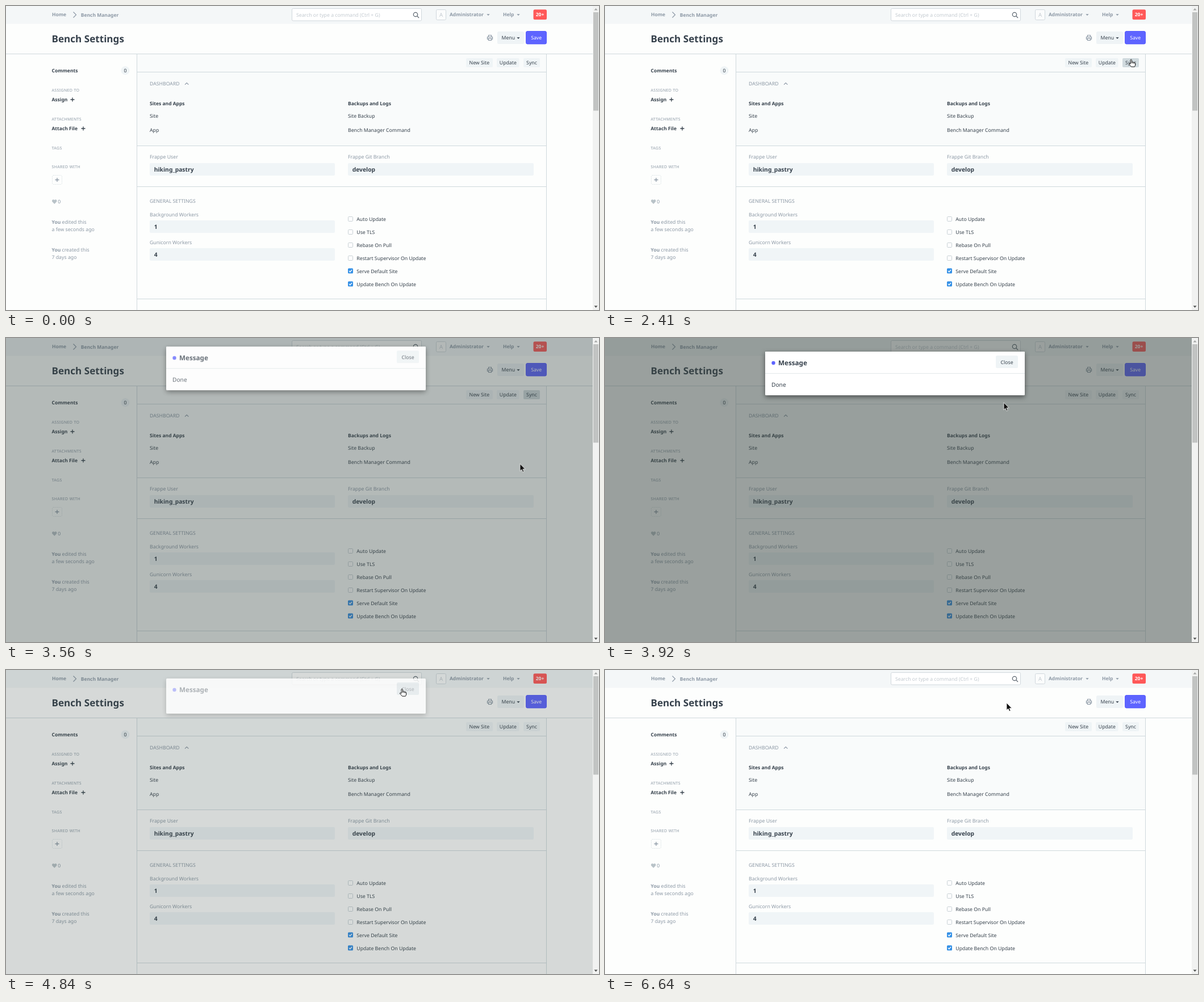
Animation, 1044 px wide and 536 px high, one loop 6710 ms. Source, as an HTML page:

```html
<!DOCTYPE html>
<html lang="en">
<head>
<meta charset="utf-8">
<title>Bench Settings</title>
<style>
  html, body { margin: 0; width: 100%; height: 100%; overflow: hidden; background: #fdfefd; }
  svg { display: block; width: 100vw; height: 100vh; }
  text { font: 8.72px "Noto Sans", "Open Sans", sans-serif; fill: #36414c; text-rendering: geometricPrecision; }
  .bold text, text.bold, tspan.bold { font-weight: 700; font-size: 8.5px; }
  .muted text, text.muted { fill: #8d99a6; }
  .caps text { font-size: 7px; letter-spacing: .35px; fill: #8d99a6; }
  .value text { font-weight: 700; font-size: 10.3px; }
  text.title { font-size: 17.1px; font-weight: 600; }
  .line { fill: none; stroke: #cfd9dd; }
  .field { fill: #f0f5f7; }
  .button { fill: #eff4f6; }
  .icon { fill: none; stroke: #8d99a6; stroke-width: 1.2; }
  .plus { fill: none; stroke: #36414c; stroke-width: 1.3; }

  .anim { animation: 6710ms linear infinite both; }
  #pointer { animation-name: move; }
  #arrow { animation-name: arrow; animation-timing-function: step-end; }
  #hand { animation-name: hand; animation-timing-function: step-end; }
  #sync { animation-name: sync; animation-timing-function: step-end; }
  #close { animation-name: close; animation-timing-function: step-end; }
  .body { animation-name: body; animation-timing-function: step-end; }
  #backdrop { animation-name: dim; }
  #panel { animation-name: panel; }
  #fade { animation-name: fade; }
  #slide { animation-name: slide; }

  @keyframes move {
    0%, 1.49% { transform: translate(742px, 300px); }
    5.51%, 15.8% { transform: translate(770px, 276px); }
    25.04%, 27.57% { transform: translate(924px, 98px); }
    28.02%, 32.49% { transform: translate(925px, 96px); }
    34%, 37.3% { transform: translate(926px, 94px); }
    42.47% { transform: translate(927px, 205px); }
    47.54%, 52.46% { transform: translate(928px, 234px); }
    58.42% { transform: translate(702px, 114px); }
    60.66% { transform: translate(699px, 82px); }
    67% { transform: translate(698px, 52px); }
    70.64%, 94.49% { transform: translate(697px, 33px); }
    95.08%, 97.32% { transform: translate(700px, 40px); }
    98.96%, 100% { transform: translate(707px, 58px); }
  }
  @keyframes arrow {
    0% { opacity: 0; }
    1.49% { opacity: 1; }
    24.2% { opacity: 0; }
    38.2% { opacity: 1; }
    67.3% { opacity: 0; }
    72.88%, 100% { opacity: 1; }
  }
  @keyframes hand {
    0% { opacity: 0; }
    24.2% { opacity: 1; }
    38.2% { opacity: 0; }
    67.3% { opacity: 1; }
    72.88%, 100% { opacity: 0; }
  }
  @keyframes sync {
    0% { fill: #eff4f6; }
    24.2% { fill: #d0dade; }
    53.65%, 100% { fill: #eff4f6; }
  }
  @keyframes close {
    0% { fill: #eff4f6; }
    67.3% { fill: #d3dce1; }
    75.86%, 100% { fill: #eff4f6; }
  }
  @keyframes body {
    0% { opacity: 1; }
    70.94%, 100% { opacity: 0; }
  }
  @keyframes dim {
    0%, 51.42% { opacity: 0; }
    53.65%, 70.94% { opacity: .5; }
    72.88% { opacity: .02; }
    75.85% { opacity: .02; }
    75.86%, 100% { opacity: 0; }
  }
  /* the white sheet covers the page sooner than its contents appear */
  @keyframes panel {
    0%, 51.42% { opacity: 0; }
    52.01% { opacity: .65; }
    53.65%, 70.94% { opacity: 1; }
    72.13% { opacity: .75; }
    72.88%, 100% { opacity: 0; }
  }
  @keyframes fade {
    0%, 51.42% { opacity: 0; }
    53.65%, 70.94% { opacity: 1; }
    72.88%, 100% { opacity: 0; }
  }
  @keyframes slide {
    0%, 51.42% { transform: translateY(-19px); animation-timing-function: ease-out; }
    55.89%, 70.94% { transform: none; }
    72.13% { transform: translateY(-9px); }
    72.88%, 100% { transform: translateY(-13px); }
  }
</style>
</head>
<body>
<svg viewBox="0 0 1044 536" preserveAspectRatio="none">
  <defs>
    <path id="caret" d="M-2.7 -1.3H2.7L0 1.6z"/>
    <path id="cross" d="M-3.5 0H3.5M0 -3.5V3.5"/>
    <rect id="box" x="-4" y="-4" width="8" height="8" rx="1.2" fill="#fff" stroke="#c8d1d5"/>
    <g id="ticked">
      <rect x="-4.5" y="-4.5" width="9" height="9" rx="1.5" fill="#3490e6"/>
      <path d="M-2.4 .1L-.7 1.9L2.5 -1.9" fill="none" stroke="#fff" stroke-width="1.4"/>
    </g>
    <filter id="shadow" x="-10%" y="-30%" width="120%" height="170%">
      <feDropShadow dx="0" dy="3" stdDeviation="4.5" flood-color="#000" flood-opacity=".5"/>
    </filter>
  </defs>

  <!-- page -->
  <rect width="1033" height="536" fill="#fdfefd"/>
  <rect width="1033" height="31.5" fill="#f4f7f8"/>
  <path d="M231 85H951V246H231z" fill="#f9fbfb"/>
  <path class="line" d="M0 84.5H1033M230.5 85V536M951.5 85V536M231 116.5H951M231 246.5H951M231 318.5H951M231 516.5H951"/>

  <!-- navigation bar -->
  <g class="bold muted">
    <text x="81" y="18.3">Home</text>
    <text x="131.7" y="18.7">Bench Manager</text>
    <text x="781" y="18.3">Administrator</text>
    <text x="875" y="18.3">Help</text>
  </g>
  <path class="icon" d="M118.5 10.5L123.5 15.5L118.5 20.5"/>
  <rect x="503.5" y="4.5" width="228" height="21.5" rx="2" fill="#fff" stroke="#d1d8dd"/>
  <text x="511" y="18.8" style="fill:#c3cad0">Search or type a command (Ctrl + G)</text>
  <g fill="none" stroke="#59636d" stroke-width="1.2"><circle cx="721" cy="15" r="3.7"/><path d="M723.7 17.7L727 21"/></g>
  <rect x="757.5" y="6.5" width="17" height="18" rx="2" fill="#fbfcfc" stroke="#d1d8dd"/>
  <text x="766" y="19" text-anchor="middle" style="fill:#c3cad0;font-size:9.5px">A</text>
  <g fill="#8d99a6"><use href="#caret" x="849" y="15.5"/><use href="#caret" x="902" y="15.5"/></g>
  <rect x="928.5" y="6.2" width="23.5" height="17.8" rx="2.5" fill="#ff5858"/>
  <text class="bold" x="940" y="18.2" text-anchor="middle" style="fill:#fff">20+</text>

  <!-- page head -->
  <text class="title" x="80.5" y="64">Bench Settings</text>
  <g class="icon"><path d="M849.5 54V51.5H854.5V54M849.5 58.5H847.5V54.5H856.5V58.5H854.5"/><rect x="849.5" y="57" width="5" height="3.5"/></g>
  <rect class="button" x="865" y="45" width="47" height="22" rx="2.5"/>
  <text x="872.5" y="59">Menu</text>
  <use href="#caret" x="902" y="56.5" fill="#36414c"/>
  <rect x="915.5" y="44.5" width="36" height="22.5" rx="2.5" fill="#5e64ff" stroke="#444bff" stroke-width=".8"/>
  <text x="933.7" y="59" text-anchor="middle" style="fill:#fff">Save</text>

  <!-- sidebar -->
  <g class="bold">
    <text x="80.5" y="116.8">Comments</text>
    <text x="80.5" y="168">Assign</text>
    <text x="80.5" y="219">Attach File</text>
  </g>
  <circle cx="210" cy="113.8" r="7.5" fill="#eff4f6"/>
  <text x="210" y="117" text-anchor="middle">0</text>
  <g class="plus"><use href="#cross" x="117" y="165"/><use href="#cross" x="136" y="216"/><use href="#cross" x="90" y="306.5" stroke="#8d99a6"/></g>
  <g class="caps">
    <text x="80.5" y="150.5">ASSIGNED TO</text>
    <text x="80.5" y="201.7">ATTACHMENTS</text>
    <text x="80.5" y="253">TAGS</text>
    <text x="80.5" y="285.7">SHARED WITH</text>
  </g>
  <rect class="line" x="81.5" y="298.5" width="17" height="16" rx="2" stroke-dasharray="2 1" stroke-opacity=".6"/>
  <path d="M85.3 349L81.6 345.2C79.6 342.6 83.3 339.6 85.3 342.3C87.3 339.6 91 342.6 89 345.2z" fill="#b9c3c8"/>
  <g class="muted">
    <text x="91.2" y="348">0</text>
    <text x="80.5" y="384"><tspan class="bold">You</tspan> edited this</text>
    <text x="80.5" y="397">a few seconds ago</text>
    <text x="80.5" y="432.6"><tspan class="bold">You</tspan> created this</text>
    <text x="80.5" y="445.7">7 days ago</text>
  </g>

  <!-- toolbar -->
  <rect class="button" x="810" y="92" width="47" height="16" rx="2"/>
  <rect class="button" x="864" y="92" width="39.5" height="16" rx="2"/>
  <rect id="sync" class="anim" x="911" y="92" width="29" height="16" rx="2"/>
  <g text-anchor="middle">
    <text x="833.3" y="103">New Site</text>
    <text x="883.8" y="103">Update</text>
    <text x="925.5" y="103">Sync</text>
  </g>

  <!-- dashboard -->
  <text class="muted" x="253" y="139.8">DASHBOARD</text>
  <path class="icon" d="M315 138.7L318.2 135.5L321.4 138.7"/>
  <g class="bold">
    <text x="253" y="175.3">Sites and Apps</text>
    <text x="602" y="175.3">Backups and Logs</text>
  </g>
  <text x="253" y="197.3">Site</text>
  <text x="253" y="221.5">App</text>
  <text x="602" y="197.3">Site Backup</text>
  <text x="602" y="221.5">Bench Manager Command</text>

  <!-- form -->
  <g class="muted">
    <text x="253" y="269.3">Frappe User</text>
    <text x="602" y="269.3">Frappe Git Branch</text>
    <text x="253" y="346.7">GENERAL SETTINGS</text>
    <text x="253" y="371">Background Workers</text>
    <text x="253" y="419.8">Gunicorn Workers</text>
  </g>
  <g class="field">
    <rect x="253" y="277" width="326" height="22" rx="2"/>
    <rect x="602" y="277" width="327" height="22" rx="2"/>
    <rect x="253" y="378" width="326" height="22" rx="2"/>
    <rect x="253" y="427" width="326" height="22" rx="2"/>
  </g>
  <g class="value">
    <text x="260.7" y="291.5">hiking_pastry</text>
    <text x="609.7" y="291.5">develop</text>
    <text x="260.7" y="393.3">1</text>
    <text x="260.7" y="442">4</text>
  </g>
  <use href="#box" x="606.5" y="375.5"/><text x="617.3" y="379">Auto Update</text>
  <use href="#box" x="606.5" y="398.5"/><text x="617.3" y="402">Use TLS</text>
  <use href="#box" x="606.5" y="421.5"/><text x="617.3" y="425">Rebase On Pull</text>
  <use href="#box" x="606.5" y="444.5"/><text x="617.3" y="447.7">Restart Supervisor On Update</text>
  <use href="#ticked" x="606.5" y="467"/><text x="617.3" y="470.6">Serve Default Site</text>
  <use href="#ticked" x="606.5" y="490"/><text x="617.3" y="493.5">Update Bench On Update</text>

  <!-- message dialog -->
  <rect id="backdrop" class="anim" width="1033" height="536" fill="#384541"/>
  <g id="slide" class="anim">
    <g id="panel" class="anim" fill="#fff">
      <rect x="282" y="24" width="457" height="62" rx="2"/>
      <rect class="anim body" x="282" y="24" width="457" height="77" rx="2"/>
    </g>
    <g id="fade" class="anim">
      <g filter="url(#shadow)" fill="#fff">
        <rect x="282" y="24" width="457" height="62" rx="2"/>
        <rect class="anim body" x="282" y="24" width="457" height="77" rx="2"/>
      </g>
      <circle cx="296.5" cy="44" r="3.2" fill="#5e64ff"/>
      <text x="305" y="48" style="font-size:11.7px;font-weight:700">Message</text>
      <rect id="close" class="anim" x="688" y="31" width="39" height="22" rx="2.5"/>
      <text x="707.5" y="46" text-anchor="middle">Close</text>
      <g class="anim body">
        <path class="line" d="M282 62.5H739" stroke-opacity=".6"/>
        <text x="293" y="85.5" style="font-size:10.2px">Done</text>
      </g>
    </g>
  </g>

  <!-- scrollbar -->
  <rect x="1033" width="11" height="536" fill="#f1f2f1"/>
  <rect x="1034" y="11" width="9" height="173.5" fill="#c1c3c2"/>
  <path d="M1035.5 7.5H1041.5L1038.5 4z" fill="#a3a5a4"/>
  <path d="M1035.5 528.5H1041.5L1038.5 532z" fill="#505251"/>

  <g id="pointer" class="anim">
    <path id="arrow" class="anim" d="M0 0V12.8L2.9 10.2L4.9 14.7L7 13.8L5.1 9.4H9.2z" fill="#111" stroke="#fff" stroke-width=".8"/>
    <path id="hand" class="anim" d="M-.9 8.2V1Q.3 -.7 1.4 1V5Q2.6 4 3.7 5.3Q4.9 4.5 5.7 5.8Q7.2 5.3 7.6 6.8V10Q7.3 12 6.3 13.2H.6Q-1.3 10.9 -3.9 8.2Q-3.4 6.4 -.9 8.2M1.4 5V7.2M3.7 5.5V7.4M5.7 6V7.6" fill="#fff" stroke="#111" stroke-width="1" stroke-linejoin="round"/>
  </g>
</svg>
</body>
</html>
```
